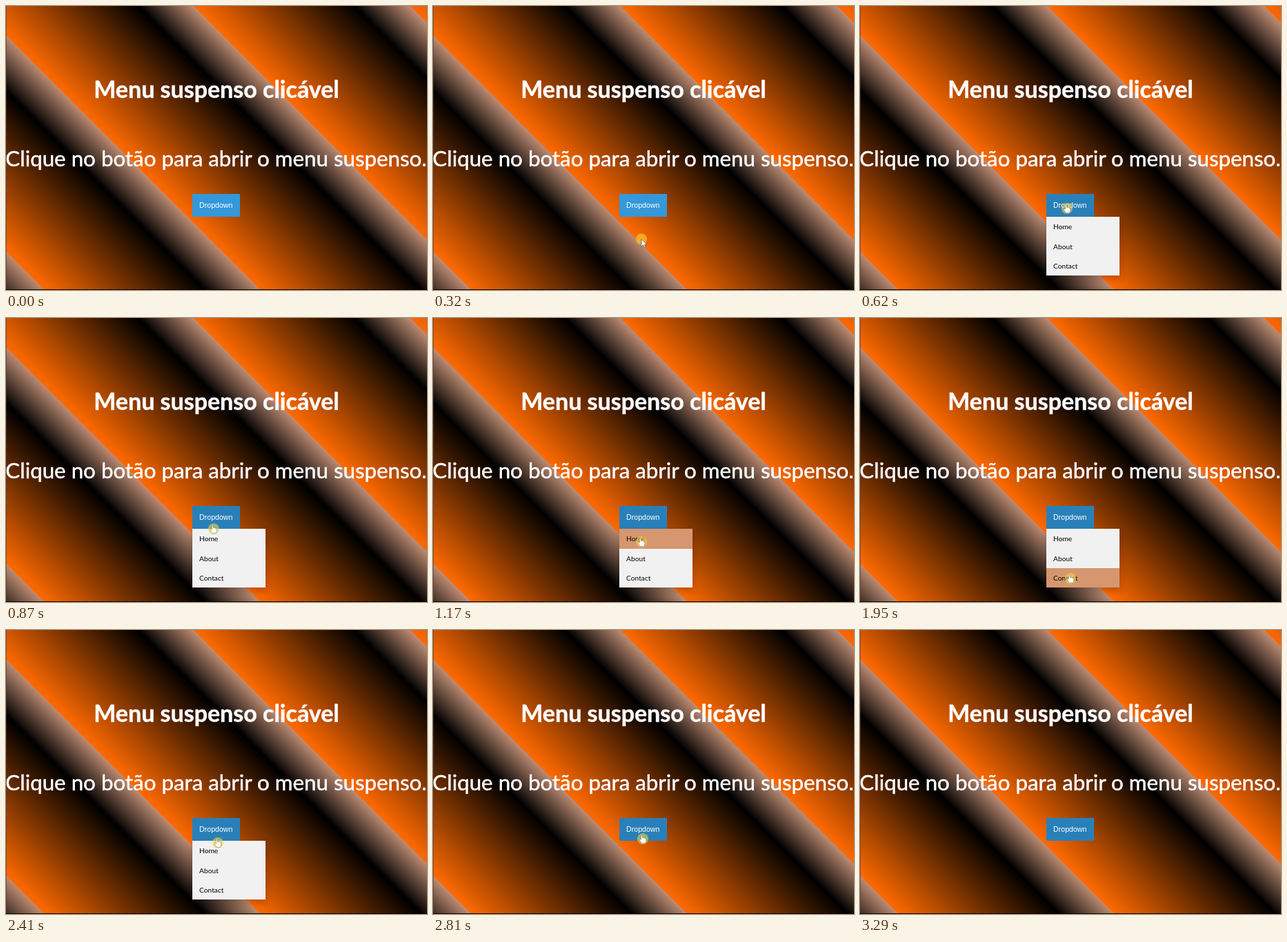
Write an HTML page that moves like this. It is 610x411 px and loops after 3.39 s.

```html
<!DOCTYPE html>
<html lang="pt">
<head>
<meta charset="utf-8">
<title>Menu suspenso</title>
<style>
  html, body { margin: 0; width: 100%; height: 100%; overflow: hidden; background: #000; }
  #stage {
    --loop: 3390ms;
    position: relative; width: 610px; height: 411px; overflow: hidden;
    font-family: Lato, "Open Sans", sans-serif;
    background: repeating-linear-gradient(45deg, #ff6a00 38.9px, #000 204px, #bd8b72 260.7px);
  }
  #stage::after {
    content: ""; position: absolute; inset: 0;
    border-bottom: 1.5px solid #0a0806; border-left: 1px solid rgba(70, 60, 55, .6);
  }
  svg { position: absolute; left: 0; top: 0; }
  .head { fill: #fff; stroke: #fff; stroke-width: .5; text-anchor: middle; }

  #btn, #menu { position: absolute; left: 269.5px; }
  #btn {
    top: 272px; width: 69.5px; height: 33.3px; line-height: 33px;
    font-family: "Liberation Sans", Arial, sans-serif; font-size: 10.6px;
    text-align: center; color: #fff; background: #3498db;
    animation: press var(--loop) step-end infinite;
  }
  #menu {
    top: 305.3px; width: 106.5px; background: #f1f1f1;
    box-shadow: 0 5px 11px rgba(0, 0, 0, .2); font-size: 10.2px; color: #000;
    animation: open var(--loop) step-end infinite;
  }
  #menu div {
    height: 28.4px; line-height: 28.6px; padding-left: 10.6px;
    animation: var(--hover) var(--loop) step-end infinite;
  }

  #pointer { animation: move var(--loop) linear infinite; }
  #hand { animation: hand var(--loop) step-end infinite; }
  #arrow { animation: arrow var(--loop) step-end infinite; }

  @keyframes press { 12% { background: #2980b9; } 100% { background: #2980b9; } }
  @keyframes open { 0%, 79% { visibility: hidden; } 15.5% { visibility: visible; } }
  @keyframes hand { 0%, 84% { visibility: hidden; } 12% { visibility: visible; } }
  @keyframes arrow { 0%, 84% { visibility: visible; } 12% { visibility: hidden; } }

  /* Each item lights up on the way down and again on the way back */
  @keyframes home {
    0%, 41.5%, 70.6% { background: transparent; }
    29%, 65.6% { background: #d6966f; }
  }
  @keyframes about {
    0%, 53.6%, 65.6% { background: transparent; }
    41.5%, 60.8% { background: #d6966f; }
  }
  @keyframes contact {
    0%, 60.8% { background: transparent; }
    53.6% { background: #d6966f; }
  }

  @keyframes move {
    0% { transform: translate(306px, 430px); }
    14%, 20% { transform: translate(300px, 293px); }
    34.5% { transform: translate(302px, 324px); }
    57.5%, 59.3% { transform: translate(305px, 377px); }
    71.1% { transform: translate(307px, 308px); }
    77%, 82.9% { transform: translate(304px, 302px); }
    94%, 100% { transform: translate(308px, 430px); }
  }
</style>
</head>
<body>
<div id="stage">
  <svg width="610" height="411">
    <text class="head" x="305" y="133" font-size="34" font-weight="700">Menu suspenso clicável</text>
    <text class="head" x="304.5" y="231.5" font-size="31.3">Clique no botão para abrir o menu suspenso.</text>
  </svg>
  <div id="btn">Dropdown</div>
  <div id="menu">
    <div style="--hover: home">Home</div>
    <div style="--hover: about">About</div>
    <div style="--hover: contact">Contact</div>
  </div>
  <svg width="610" height="411">
    <g id="pointer">
      <circle r="8" fill="#f3d53c" fill-opacity=".6"/>
      <path id="hand" fill="#fff" stroke="#555" stroke-width=".5" stroke-linejoin="round"
        d="M-2.6 1V-5.2Q-1.6-6.6-.6-5.2V-1.6Q.6-2.4 1.4-1.2Q2.6-1.8 3.2-.7Q4.6-1 4.8.6V3Q4.6 5 3.6 6.4H-1.8L-5.2 1.6Q-5-.4-2.6 1Z"/>
      <path id="arrow" fill="#fff" stroke="#333" stroke-width=".6"
        d="M0 0V11L2.6 8.6L4.3 12.4L6 11.6L4.3 8H7.8Z"/>
    </g>
  </svg>
</div>
</body>
</html>
```
